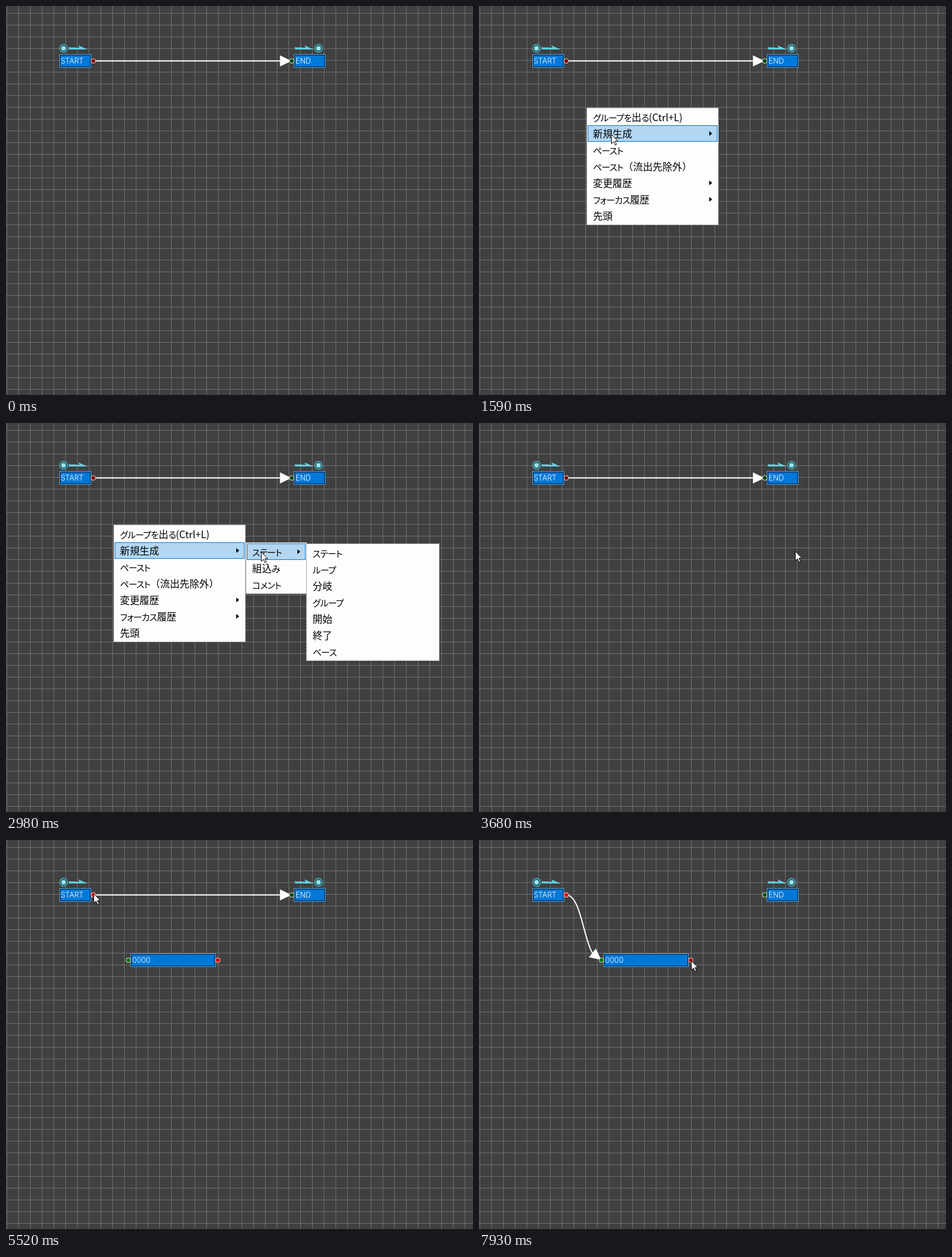
Animation, 795 px wide and 662 px high, one loop 8000 ms. Source, as an HTML page:

```html
<!DOCTYPE html>
<html lang="ja">
<head>
<meta charset="utf-8">
<title>Flow editor</title>
<style>
html, body { margin: 0; width: 100%; height: 100%; overflow: hidden; }
body {
  position: relative;
  background:
    linear-gradient(#707070 1px, transparent 1px) 0 12px / 20px 20px,
    linear-gradient(90deg, #707070 1px, transparent 1px) 1px 0 / 20px 20px,
    #404040;
}
svg { position: absolute; left: 0; top: 0; }
svg text { font: 300 12.5px Inter, sans-serif; fill: #fff; }
.menu {
  position: absolute; box-sizing: border-box; padding: 1px;
  border: 1px solid #a8a8a8; background: #fdfdfd; color: #000;
  font: 16.7px/28px "Noto Sans CJK JP", "Noto Sans CJK", sans-serif;
  white-space: nowrap;
}
.row { position: relative; box-sizing: border-box; height: 28px; padding-left: 9px; }
.row.on { background: #b3d6f2; box-shadow: inset 0 0 0 1px #0078d7; }
.row.sub::after {
  content: ""; position: absolute; right: 9px; top: 10px;
  border: solid transparent; border-width: 4px 0 4px 5px; border-left-color: #000;
}
.kana { font-size: 15px; letter-spacing: -.7px; font-feature-settings: "palt"; }
#dialog { position: absolute; left: 235px; top: 206px; width: 156px; height: 42px; background: #f0f0f0; }
#dialog div {
  position: absolute; top: 8px; box-sizing: border-box; width: 73px; height: 21px;
  border: 1px solid #adadad; background: #e1e1e1; color: #000;
  font: 11.5px/19px "Liberation Sans", sans-serif; text-align: center;
}
#dialog .ok { left: 1px; width: 72px; border-color: #0078d7; background: #e5f1fb; }
#dialog .ok::after { content: ""; position: absolute; inset: 0; border: 1px dotted #222; }
#dialog .cancel { left: 81px; }
</style>
</head>
<body>
<svg id="stage" width="795" height="662">
  <rect id="speck" x="195" y="170" width="12" height="1" fill="#4a3050"/>
  <g id="straight" fill="#fff" stroke="#fff"></g>
  <g id="curve" fill="#fff" stroke="#fff"></g>
  <g id="drag" fill="#f00" stroke="#f00"></g>
</svg>
<div id="dialog"><div class="ok">OK</div><div class="cancel">Cancel</div></div>
<svg id="top" width="795" height="662">
  <g id="pointer">
    <circle id="press" cx="-.5" cy=".5" r="12" fill="#ff0" fill-opacity=".52"/>
    <path d="M.5 .5V16.5L4.2 13L6.8 18.8L9.2 17.8L6.7 12H11.6Z" fill="#fff" stroke="#000"/>
  </g>
</svg>
<script>
const LOOP = 8000, TICK = 76.7;
const $ = id => document.getElementById(id);

function draw(parent, tag, attrs, text) {
  const el = document.createElementNS("http://www.w3.org/2000/svg", tag);
  for (const k in attrs) el.setAttribute(k, attrs[k]);
  if (text) el.textContent = text;
  parent.append(el);
  return el;
}

// Nodes, ports and the two terminal icons
function node(x, y, w, label, textX) {
  const g = draw($("stage"), "g", {});
  draw(g, "rect", { x, y, width: w, height: 23, fill: "#55b4fa" });
  draw(g, "rect", { x: x + 1, y: y + 1, width: w - 2, height: 21, fill: "#001020" });
  draw(g, "rect", { x: x + 2, y: y + 2, width: w - 4, height: 19, fill: "#0078d7" });
  draw(g, "text", { x: textX, y: y + 15.5 }, label);
  return g;
}
const port = (g, x, y, fill) =>
  draw(g, "circle", { cx: x + .5, cy: y + .5, r: 4, fill, stroke: "#f4e8e8" });

function icon(ringX, dartX) {
  const s = $("stage");
  draw(s, "circle", { cx: ringX, cy: 72, r: 6.7, fill: "#28606c", stroke: "#4fa9b9", "stroke-width": 1.4 });
  draw(s, "circle", { cx: ringX, cy: 72, r: 3.8, fill: "#9be6f2" });
  draw(s, "path", {
    d: `M${dartX} 70l3 0 1 1 2-1 1 1 2-1 1 1 2-1 1 1 6 0-2-4 16 7-33 0 2-2z`,
    fill: "#62cfe0"
  });
}

const start = node(91, 82, 54, "START", 93);
const startPort = port(start, 148, 93, "#800000");
const end = node(490, 82, 54, "END", 493);
port(end, 486, 93, "#004a10");
const state = node(212, 193, 145, "0000", 215);
port(state, 208, 204, "#007010");
const statePort = port(state, 360, 204, "#c80000");
icon(98, 106);
icon(532, 491);

// Link with an arrowhead; bent links leave and arrive horizontally
function link(g, x0, y0, x1, y1, bent) {
  const at = u => {
    const e = bent ? u * u * (3 - 2 * u) : u;
    const f = bent ? 1.5 * u * (1 - u) + u ** 3 : u;
    return [x0 + (x1 - x0) * f, y0 + (y1 - y0) * e];
  };
  let u = 1;
  while (u > 0 && Math.hypot(at(u)[0] - x1, at(u)[1] - y1) < 19) u -= .002;
  const [bx, by] = at(Math.max(u, 0));
  const pts = [];
  for (let i = 0; i <= 30; i++) pts.push(at(Math.max(u, 0) * i / 30).map(v => v.toFixed(2)));
  const len = Math.hypot(x1 - bx, y1 - by) || 1;
  const nx = -(y1 - by) / len * 9.5, ny = (x1 - bx) / len * 9.5;
  g.innerHTML = `<polyline points="${pts.join(" ")}" fill="none" stroke-width="2"/>` +
    `<path d="M${x1} ${y1}L${bx + nx} ${by + ny}L${bx - nx} ${by - ny}Z" stroke="none"/>`;
}
link($("straight"), 148, 93.5, 486, 93.5);
link($("curve"), 148.5, 93.5, 208, 204, true);

// Context menus; a trailing ">" marks an item with a submenu
function menu(x, y, w, items) {
  const el = document.createElement("div");
  el.className = "menu";
  el.style.cssText = `left:${x}px;top:${y}px;width:${w}px`;
  el.innerHTML = items.map(s => {
    const label = s.replace(">", "").replace(/[ぁ-ヿ]+/g, "<span class=kana>$&</span>");
    return `<div class="row${s.endsWith(">") ? " sub" : ""}">${label}</div>`;
  }).join("");
  document.body.insertBefore(el, $("top"));
  return { el, x, y, w };
}
const main = menu(183, 173, 225, ["グループを出る(Ctrl+L)", "新規生成>", "ペースト",
  "ペースト（流出先除外）", "変更履歴>", "フォーカス履歴>", "先頭"]);
const kinds = menu(408, 203, 104, ["ステート>", "組込み", "コメント"]);
const states = menu(511, 205, 227, ["ステート", "ループ", "分岐", "グループ", "開始", "終了", "ベース"]);

const hover = (m, row) =>
  [...m.el.children].forEach((r, i) => r.classList.toggle("on", i === row));
const rowAt = (m, [x, y]) =>
  x >= m.x && x < m.x + m.w ? Math.floor((y - m.y - 2) / 28) : -1;

// Pointer stops: time, x, y, optional control point of the way there
const stops = [
  [70, 621, 616], [810, 205, 192], [1000, 203, 182], [1440, 203, 182], [1660, 235, 236],
  [1770, 235, 236], [1960, 260, 219], [2270, 260, 219], [2820, 434, 219], [3070, 434, 219],
  [3260, 538, 218], [3770, 538, 218], [4600, 185, 102, 380, 272], [4890, 143, 93],
  [5090, 143, 93], [5130, 142, 92], [5240, 142, 92], [5480, 149, 91], [5580, 149, 91],
  [5980, 212, 206], [6060, 229, 207], [6170, 229, 207], [6480, 258, 217], [6690, 258, 217],
  [7000, 384, 211], [7290, 370, 207], [7570, 370, 207], [7860, 361, 205]
];
function pointerAt(t) {
  const i = stops.findIndex(s => s[0] > t);
  if (i < 1) return (i ? stops[stops.length - 1] : stops[0]).slice(1, 3);
  const a = stops[i - 1], b = stops[i];
  const p = (t - a[0]) / (b[0] - a[0]);
  const e = p * (2 - p);
  return [1, 2].map(k => {
    const c = b[k + 2] ?? (a[k] + b[k]) / 2;
    return a[k] * (1 - e) ** 2 + 2 * c * e * (1 - e) + b[k] * e * e;
  });
}

const presses = [[1130, 1290], [2130, 2270], [2830, 2980], [5570, 5990], [6580, 6700]];
const show = (el, on) => { el.style.visibility = on ? "visible" : "hidden"; };

function render(t) {
  const within = (a, b) => t >= a && t < b;
  const pos = pointerAt(Math.floor(t / TICK + .25) * TICK).map(Math.round);

  show($("pointer"), t >= 70);
  $("pointer").setAttribute("transform", `translate(${pos})`);
  $("press").style.display = presses.some(p => within(...p)) ? "" : "none";

  show(main.el, within(1290, 3600));
  main.el.style.opacity = Math.min(1, Math.max(0, (t - 1270) / 180));
  show(kinds.el, within(2190, 3600));
  show(states.el, within(2900, 3600));
  hover(main, t < 1440 ? -1 : pos[0] >= kinds.x ? 1 : rowAt(main, pos));
  hover(kinds, pos[0] >= states.x ? 0 : rowAt(kinds, pos));
  hover(states, rowAt(states, pos));

  show($("speck"), t >= 3600);
  show(state, t >= 3830);
  startPort.setAttribute("fill", t >= 5440 ? "#f00000" : "#800000");
  statePort.setAttribute("fill", t >= 6060 ? "#a80000" : "#c80000");

  const dragging = within(5580, 6700);
  show($("drag"), dragging);
  if (dragging) link($("drag"), 148.5, 93.5, ...(t < 5980 ? pos : [208, 204]));
  show($("dialog"), within(6210, 6700));
  show($("straight"), t < 6700);
  show($("curve"), t >= 6700);
}

const t0 = performance.now();
function frame() {
  render((performance.now() - t0) % LOOP);
  requestAnimationFrame(frame);
}
frame();
</script>
</body>
</html>
```
